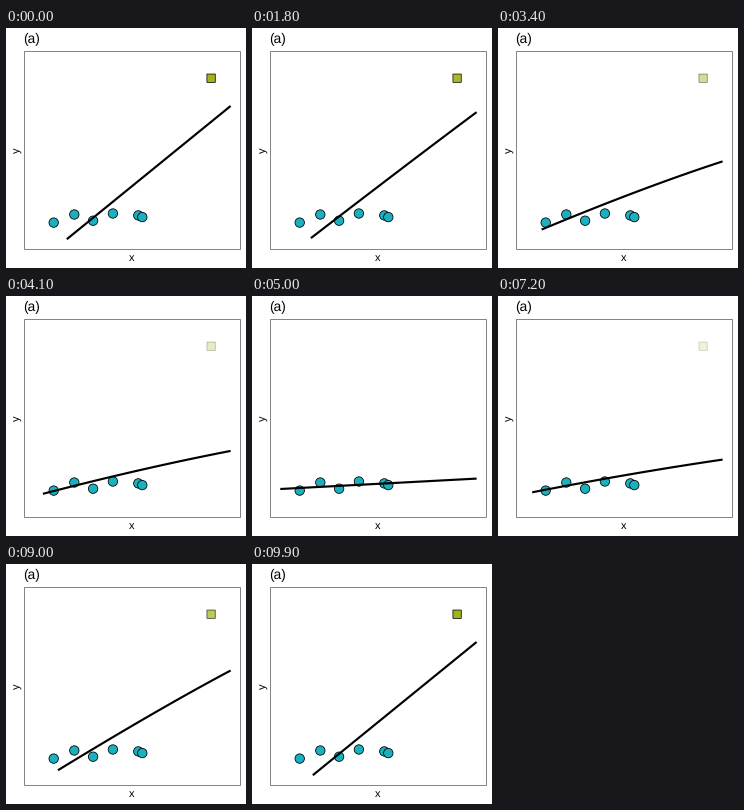
A matplotlib script for the animation above (10 s loop, 240 by 240 pixels).

```python
import numpy as np
import matplotlib.pyplot as plt
from matplotlib.animation import FuncAnimation
from matplotlib.patches import Circle, Rectangle

SIZE, DPI = 240, 80
PX = 72 / DPI  # points per pixel
FRAMES, INTERVAL = 100, 100

plt.rcParams["font.family"] = "Liberation Sans"
plt.rcParams["text.hinting"] = "none"

POINTS = [(47.7, 194.6), (68.3, 186.5), (87.1, 192.7),
          (106.9, 185.5), (132.3, 187.4), (136.3, 189.1)]
OUTLIER = (205.1, 50.2)
R = 4.7
HALF = R * np.sqrt(np.pi) / 2

# Fitted line with and without the outlier: (x, y) of both ends
FIT_WITH = np.array([[60.8, 211.2], [224.6, 78.0]])
FIT_WITHOUT = np.array([[28.3, 193.0], [224.6, 182.6]])

fig = plt.figure(figsize=(SIZE / DPI, SIZE / DPI), dpi=DPI, facecolor="white")
ax = fig.add_axes([0, 0, 1, 1])
ax.set(xlim=(0, SIZE), ylim=(SIZE, 0))
ax.axis("off")


def label(x, y, text, size, **kw):
    ax.text(x, y, text, fontsize=size * PX, va="baseline",
            rotation_mode="anchor", **kw)


def along(ends, u):
    return ends[0] + u[:, None] * (ends[1] - ends[0])


label(17.6, 15, "(a)", 13.7, ha="left")
label(125.8, 232.6, "x", 11, ha="center")
label(14.3, 122.6, "y", 11, ha="center", rotation=90)

ax.add_patch(Rectangle((18.5, 23.5), 216, 198, fill=False,
                       ec="#858585", lw=PX, snap=False))

for p in POINTS:
    ax.add_patch(Circle(p, R, fc="#1bb0c0", ec="black", lw=0.8 * PX))

square = Rectangle((OUTLIER[0] - HALF, OUTLIER[1] - HALF), 2 * HALF, 2 * HALF,
                   fc="#a5b31b", ec="black", lw=0.75 * PX, snap=False)
ax.add_patch(square)

line, = ax.plot([], [], color="black", lw=2.15 * PX,
                solid_capstyle="butt", zorder=3)

# Uneven spacing on the steep fit makes the line bow slightly while it moves
u = np.linspace(0, 1, 80)
steep = along(FIT_WITH, u + 0.24 * u * (1 - u))
flat = along(FIT_WITHOUT, u)


def update(i):
    t = np.interp(i, [16, 50, 66, 99], [0, 1, 1, 0])
    line.set_data(*(steep + t * (flat - steep)).T)
    square.set_alpha(1 - t)
    return line, square


anim = FuncAnimation(fig, update, frames=FRAMES, interval=INTERVAL,
                     repeat=True, repeat_delay=0)
plt.show()
```
